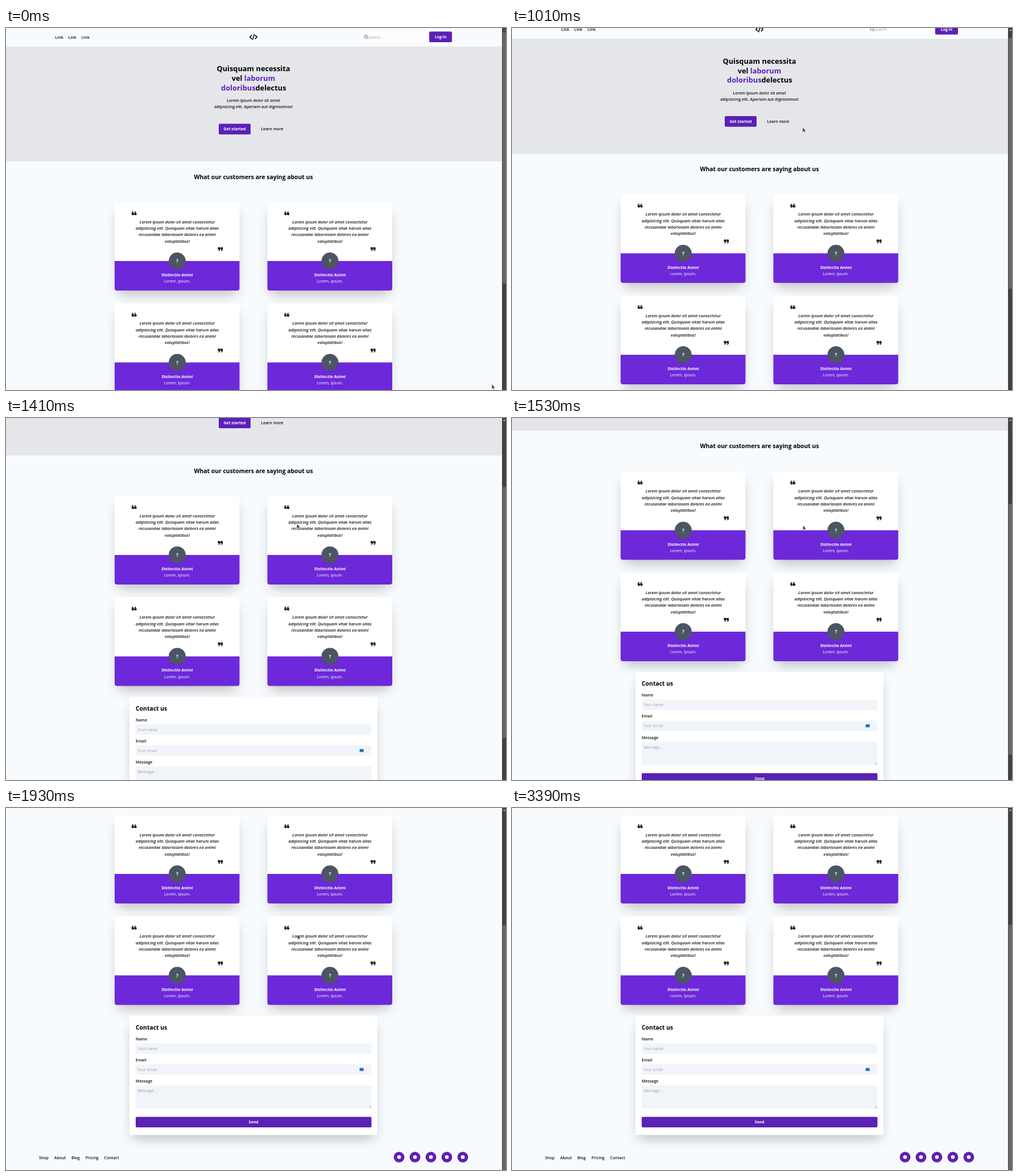
An HTML page for the animation above (3440 ms loop, 879 px wide and 637 px high).

```html
<!DOCTYPE html>
<html lang="en">
<head>
<meta charset="utf-8">
<title>Landing page scroll</title>
<style>
  html, body { margin: 0; width: 100%; height: 100%; overflow: hidden; background: #f8fbfe; }
  svg { display: block; width: 879px; height: 637px; }
  text { font: 600 7.03px "Open Sans", "Noto Sans", sans-serif; fill: #111; white-space: pre; }
  .h1 { font-weight: 700; font-size: 12.8px; fill: #000; }
  .h2 { font-weight: 700; font-size: 10.4px; fill: #000; }
  .it { font-size: 7.3px; font-style: italic; }
  .w { fill: #fff; }
  .b { font-weight: 700; font-size: 6.9px; }
  .q { font-weight: 700; font-size: 8.6px; }
  .r { font-weight: 400; font-size: 6.9px; }
  .ph { font-weight: 400; font-size: 6.9px; fill: #9ca3af; }
  .mid { text-anchor: middle; }
  .accent { fill: #5b21b6; }
</style>
</head>
<body>
<svg viewBox="0 0 879 637" xmlns="http://www.w3.org/2000/svg">
  <defs>
    <filter id="blur" x="-20%" y="-30%" width="140%" height="160%"><feGaussianBlur stdDeviation="11"/></filter>
    <path id="quote" d="M3.9 3.6V5.6Q3.9 6.6 2.9 6.6H1Q0 6.6 0 5.6V2.9Q0 .3 2.6 .1H3V1.3H2.6Q1.3 1.4 1.3 2.6H2.9Q3.9 2.6 3.9 3.6ZM8.5 3.6V5.6Q8.5 6.6 7.5 6.6H5.6Q4.6 6.6 4.6 5.6V2.9Q4.6 .3 7.2 .1H7.6V1.3H7.2Q5.9 1.4 5.9 2.6H7.5Q8.5 2.6 8.5 3.6Z"/>
  </defs>
  <rect width="879" height="637" fill="#f8fbfe"/>
  <g id="page"></g>
  <rect x="872" width="7" height="637" fill="#424242"/>
  <path id="up" d="M873.8 5L876 2.6L878.2 5Z" fill="#c8c8c8"/>
  <rect id="thumb" x="873" y="8" width="6" height="441.5" fill="#686868"/>
  <path id="cursor" d="M0 0V8.2L1.9 6.5L3.2 9.3L4.5 8.7L3.2 6H5.8Z" fill="#3a3a3e" stroke="#f4f4f4" stroke-width=".5"/>
</svg>
<script>
const LOOP = 3440, STEP = 20;
const PURPLE = '#5b21b6', FIELD = '#f1f5f9';
const $ = id => document.getElementById(id);

// Static page
const text = (s, x, y, cls = '') => `<text x="${x}" y="${y}" class="${cls}">${s}</text>`;
const mid = (s, x, y, cls = '') => text(s, x, y, 'mid ' + cls);
const rect = (x, y, w, h, fill, r = 0, more = '') =>
  `<rect x="${x}" y="${y}" width="${w}" height="${h}" rx="${r}" fill="${fill}" ${more}/>`;
const circle = (x, y, r, fill) => `<circle cx="${x}" cy="${y}" r="${r}" fill="${fill}"/>`;
const shadow = (x, y, w, h) =>
  rect(x + 5.5, y + 17, w - 11, h - 11, '#000', 4, 'opacity=".25" filter="url(#blur)"');
const button = (s, x, y, w, h) =>
  rect(x, y, w, h, PURPLE, 2) + mid(s, x + w / 2, y + h / 2 + 2.5, 'w b');

function header() {
  return [86.5, 109.6, 132.8].map(x => text('Link', x, 18.6)).join('') +
    `<path d="M431.8 12.9L428.8 15.9L431.8 18.9M438.2 12.9L441.2 15.9L438.2 18.9M436.5 11.3L433.5 20.5"
      fill="none" stroke="#000" stroke-width="1.5" stroke-linecap="round" stroke-linejoin="round"/>` +
    rect(622.5, 6.3, 116, 18.7, '#fefefe', 2) +
    `<path d="M634.6 17.3L636.6 19.3M635.2 15.2A2.6 2.6 0 1 1 630 15.2A2.6 2.6 0 1 1 635.2 15.2"
      fill="none" stroke="#7c8798" stroke-width="1.1"/>` +
    text('Search...', 637, 18.5, 'ph') + button('Log in', 744, 6.3, 40, 18.7);
}

function hero() {
  return rect(0, 32.5, 872, 202.5, '#e5e6ea') +
    mid('Quisquam necessita', 435, 76, 'h1') +
    mid('vel <tspan class="accent">laborum</tspan>', 435, 93, 'h1') +
    mid('<tspan class="accent">doloribus</tspan>delectus', 435.3, 109.6, 'h1') +
    mid('Lorem ipsum dolor sit amet', 435, 130.4) +
    mid('adipisicing elit. Aperiam aut dignissimos!', 435, 141.4) +
    button('Get started', 374, 168.5, 56, 18.7) + mid('Learn more', 468, 180.4);
}

function card(x, y) {
  const lines = ['Lorem ipsum dolor sit amet consectetur', 'adipisicing elit. Quisquam vitae harum alias',
    'recusandae laboriosam dolores ea animi', 'voluptatibus!'];
  return `<g transform="translate(${x} ${y})">` + shadow(0, 0, 219.5, 155.7) +
    rect(0, 0, 219.5, 120, '#fff', 4) +
    `<path d="M0 103.7H219.5V151.7Q219.5 155.7 215.5 155.7H4Q0 155.7 0 151.7Z" fill="#6d28d9"/>` +
    '<use href="#quote" x="30" y="16.3"/><use href="#quote" transform="translate(190 86) rotate(180)"/>' +
    lines.map((s, i) => mid(s, 110, 37.6 + i * 11.25, 'it')).join('') +
    circle(110, 103.7, 14.9, '#4b5563') + mid('?', 110, 106.9, 'w q') +
    mid('Distinctio Animi', 110, 130.8, 'w b') + mid('Lorem, ipsum.', 110, 142.1, 'w r') + '</g>';
}

function field(label, hint, y, h) {
  return text(label, 228, y - 5.2) + rect(228, y, 414.5, h, FIELD, 2) + text(hint, 231.5, y + 11.7, 'ph');
}

function contact() {
  return shadow(217, 659.5, 436, 210) + rect(217, 659.5, 436, 210, '#fff', 2) +
    text('Contact us', 228, 683.7, 'h2') +
    field('Name', 'Your name', 708, 18.5) + field('Email', 'Your email', 745, 18.5) +
    field('Message', 'Message...', 782.3, 40.7) +
    rect(621.6, 751.6, 7.2, 5.2, '#2474b8', .6) +
    '<path d="M638 822L641.6 818.4M640 822L641.6 820.4" stroke="#888" stroke-width=".7"/>' +
    button('Send', 228, 837.5, 414.5, 18.5);
}

function footer() {
  const links = { Shop: 58, About: 84.8, Blog: 115, Pricing: 139.7, Contact: 172.5 };
  return Object.entries(links).map(([s, x]) => text(s, x, 912)).join('') +
    [0, 1, 2, 3, 4].map(i => circle(691 + i * 28, 908.3, 9.4, PURPLE) + circle(691 + i * 28, 908.3, 3.3, '#fff')).join('');
}

$('page').innerHTML = header() + hero() +
  mid('What our customers are saying about us', 435, 265.8, 'h2') +
  [0, 1, 2, 3].map(i => card(191 + i % 2 * 268.5, 306.3 + (i >> 1) * 178.5)).join('') +
  contact() + footer();

// Motion tables: time, values..., easing towards that row
const ease = {
  lin: k => k,
  in: k => k * k,
  out: k => k * (2 - k),
  both: k => k * k * (3 - 2 * k)
};
const SCROLL = [[0, 0, 'lin'], [940, 0, 'lin'], [1010, 13.5, 'in'], [1230, 104, 'lin'],
  [1530, 212.5, 'lin'], [1690, 275.5, 'lin'], [1790, 294, 'out']];
const POINTER = [[0, 854, 627, 'lin'], [480, 507, 167, 'both'], [700, 507, 167, 'lin'], [940, 511, 175, 'both'],
  [1010, 511, 175, 'lin'], [1230, 511, 182, 'lin'], [1530, 511.5, 189, 'lin'], [1690, 513, 202, 'in'],
  [2230, 512, 232, 'out'], [2330, 512, 232, 'lin'], [2530, 660, 409, 'in'], [2840, 871, 600, 'out'],
  [3220, 872, 640, 'lin'], [3380, 872, 640, 'lin'], [3381, 868, 636, 'lin']];

function at(rows, t) {
  const n = rows.findIndex(r => r[0] > t);
  if (n < 0) return rows.at(-1).slice(1, -1);
  const a = rows[n - 1], b = rows[n];
  const k = ease[b.at(-1)]((t - a[0]) / (b[0] - a[0]));
  return a.slice(1, -1).map((v, i) => v + (b[i + 1] - v) * k);
}

function draw(t) {
  const [scroll] = at(SCROLL, t), [x, y] = at(POINTER, t);
  $('page').setAttribute('transform', `translate(0 ${-scroll})`);
  $('thumb').setAttribute('y', 8 + scroll * .672);
  $('thumb').setAttribute('fill', t >= 2860 && t < 3220 ? '#7b7b7b' : '#686868');
  $('up').setAttribute('opacity', scroll > 0 ? 1 : .35);
  $('cursor').setAttribute('transform', `translate(${x} ${y})`);
}

// The picture steps every 20 ms, at 10, 30, 50...; a few ms of slack absorb timer jitter
const start = performance.now();
function tick() {
  const t = (performance.now() - start) % LOOP;
  draw(Math.max(0, Math.floor((t - 4) / STEP) * STEP + 10));
  requestAnimationFrame(tick);
}
tick();
</script>
</body>
</html>
```
